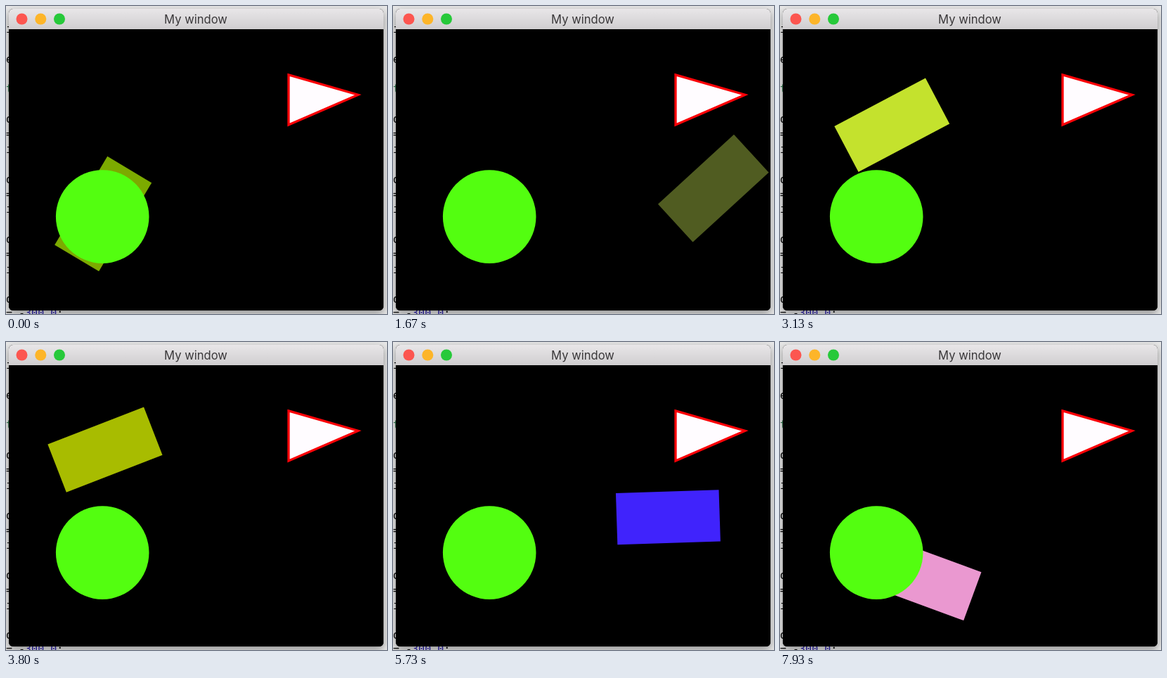
Animation of 542 by 438 pixels, one loop 8000 ms. Source, as an HTML page:

```html
<!DOCTYPE html>
<html lang="en">
<head>
<meta charset="utf-8">
<title>My window</title>
<style>
  html, body { margin: 0; width: 100%; height: 100%; overflow: hidden; background: #e9e9e9; }
  svg { display: block; width: 542px; height: 438px; }
  .code { font: 15px "DejaVu Sans Mono", monospace; white-space: pre; }
  .title { font: 16.6px Inter, sans-serif; fill: #3a383a; text-anchor: middle; }
  .shadow { filter: drop-shadow(0 4px 6px rgba(0, 0, 0, .4)); }
</style>
</head>
<body>
<svg viewBox="0 0 542 438">
  <defs>
    <linearGradient id="bar" x2="0" y2="1">
      <stop offset="0" stop-color="#e8e6e8"/>
      <stop offset="1" stop-color="#d0ced0"/>
    </linearGradient>
    <clipPath id="frame"><rect x="4" y="4" width="533" height="429" rx="6"/></clipPath>
  </defs>

  <g class="code" id="code">
    <text x="0" y="442">= -<tspan fill="#2a1fae">300.0</tspan>;</text>
  </g>

  <rect class="shadow" x="4" y="4" width="533" height="429" rx="6"/>
  <g clip-path="url(#frame)">
    <rect x="4" y="33" width="533" height="400"/>
    <rect id="box"/>
    <circle cx="137.2" cy="299.6" r="66.3" fill="#53fe10"/>
    <path d="M402 97.9L500.8 126.2L402 168.9Z" fill="#fffcff" stroke="#fb0007" stroke-width="3.3"/>
    <rect x="4" y="4" width="533" height="29" fill="url(#bar)"/>
    <circle cx="22.5" cy="18.5" r="8" fill="#fc5650"/>
    <circle cx="49.3" cy="18.5" r="8" fill="#fdb529"/>
    <circle cx="76" cy="18.5" r="8" fill="#27c93a"/>
    <text class="title" x="270" y="25">My window</text>
  </g>
</svg>
<script>
  const FPS = 15, LOOP = 8000, FRAMES = LOOP * FPS / 1000;
  const SUBSTEPS = 40, DT = 1 / FPS / SUBSTEPS;
  const SPEED = 200, SPIN = 10;            // px/s, degrees/s
  const W = 146.6, H = 73.3;
  // The box sinks slightly into a wall before it turns back
  const WALLS = { left: 1.6, right: 537.2, top: 30.8, bottom: 436.8 };
  // Each hit on a wall moves on to the next colour
  const COLOURS = ['#7caa00', '#667f18', '#505c21', '#c4e22d', '#b6cf16',
    '#a8bc00', '#746e80', '#4023fc', '#00ccff', '#ea98d0'];

  const box = document.getElementById('box');
  const code = document.getElementById('code');

  // Editor text peeking out left of the window, one line every 21.35px
  [...'iet o=i o=i o=i o'].forEach((char, i) => {
    const line = i < 3 ? i * 2 : i + 2;
    const text = document.createElementNS('http://www.w3.org/2000/svg', 'text');
    text.textContent = char;
    text.setAttribute('y', 38 + line * 21.35);
    if (char === 't') text.setAttribute('fill', '#2c7a4b');
    code.append(text);
  });

  // The box turns about its lower right corner, which moves in straight lines
  function simulate() {
    let x = 207.2, y = 251.4, dirX = 1, dirY = -1, hits = 0;
    const poses = [];
    for (let i = 0; i < FRAMES * SUBSTEPS; i++) {
      const angle = -59.2 + SPIN * i * DT;
      if (i % SUBSTEPS === 0) poses.push({ x, y, angle, colour: COLOURS[hits % COLOURS.length] });

      x += dirX * SPEED * DT;
      y += dirY * SPEED * DT;
      const c = Math.cos(angle * Math.PI / 180), s = Math.sin(angle * Math.PI / 180);
      const xs = [x, x - W * c, x + H * s, x - W * c + H * s];
      const ys = [y, y - W * s, y - H * c, y - W * s - H * c];
      const hitX = dirX > 0 ? Math.max(...xs) > WALLS.right : Math.min(...xs) < WALLS.left;
      const hitY = dirY > 0 ? Math.max(...ys) > WALLS.bottom : Math.min(...ys) < WALLS.top;
      if (hitX) dirX = -dirX;
      if (hitY) dirY = -dirY;
      hits += hitX + hitY;
    }
    return poses;
  }

  const poses = simulate();
  box.setAttribute('x', -W);
  box.setAttribute('y', -H);
  box.setAttribute('width', W);
  box.setAttribute('height', H);

  const start = performance.now();
  function draw() {
    // The small offset absorbs step times rounded to 10 ms
    const step = Math.floor(((performance.now() - start) % LOOP + 4) * FPS / 1000) % FRAMES;
    const { x, y, angle, colour } = poses[step];
    box.setAttribute('transform', `translate(${x} ${y}) rotate(${angle})`);
    box.setAttribute('fill', colour);
    requestAnimationFrame(draw);
  }
  draw();
</script>
</body>
</html>
```
